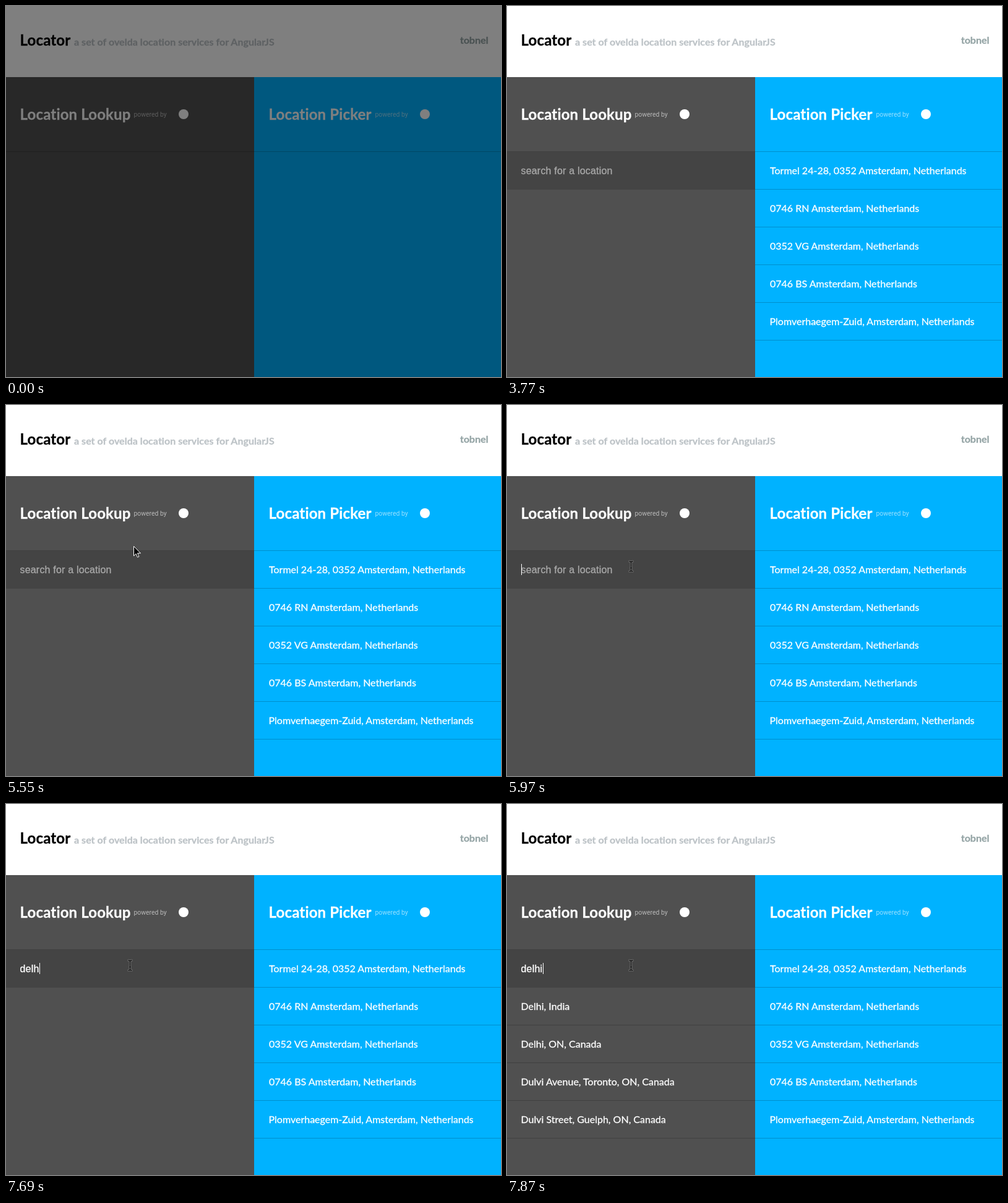
Recreate the animation shown at these times as an HTML page. Size 800x600 px, loop 8000 ms.

```html
<!DOCTYPE html>
<html lang="en">
<head>
<meta charset="utf-8">
<title>Locator</title>
<style>
  html, body { margin: 0; width: 100%; height: 100%; overflow: hidden; background: #fff; }
  svg { display: block; width: 800px; height: 600px; }
  text {
    --ink: #fff;
    font: 16px Lato, sans-serif;
    font-variant-ligatures: none;
    fill: var(--ink);
    stroke: var(--ink);
    stroke-width: .3px;
  }
  .title { font-size: 24px; font-weight: 700; letter-spacing: .15px; }
  .name { --ink: #000; }
  .note { --ink: #bdc3c7; font-weight: 700; letter-spacing: .03px; }
  .link { --ink: #95a5a6; font-weight: 700; text-anchor: end; }
  .by { font: 10.4px Roboto, sans-serif; fill-opacity: .6; stroke: none; }
  .input { font-family: "Liberation Sans", Arial, sans-serif; letter-spacing: .19px; }
  .hint { --ink: #a9a9a9; }
  .line { fill: #000; fill-opacity: .2; }
  .key { fill: #000; stroke: #fff; stroke-linejoin: round; }

  /* every step holds until the next one */
  .dim, .ready, .loading, .picks, .hint, .finds, .caret, .arrow, .beam, .typed tspan {
    animation: 8s step-end infinite;
  }
  .dim { animation-name: dim; }
  .ready { animation-name: ready; }
  .loading { animation-name: loading; }
  .picks { animation-name: picks; }
  .hint { animation-name: hint; }
  .finds { animation-name: finds; }
  .caret { animation-name: caret; }
  .arrow { animation-name: arrow; }
  .beam { animation-name: beam; }
  .typed .k1 { animation-name: k1; }
  .typed .k2 { animation-name: k2; }
  .typed .k3 { animation-name: k3; }
  .typed .k4 { animation-name: k4; }
  .typed .k5 { animation-name: k5; }

  @keyframes dim { 0% { visibility: visible } 1.5%, 100% { visibility: hidden } }
  @keyframes ready { 0% { visibility: hidden } 1.5%, 100% { visibility: visible } }
  @keyframes loading {
    0% { visibility: hidden } 1.5% { visibility: visible } 47.125%, 100% { visibility: hidden }
  }
  @keyframes picks { 0% { visibility: hidden } 47.125%, 100% { visibility: visible } }
  @keyframes hint {
    0% { visibility: hidden } 1.5% { visibility: visible } 88.75%, 100% { visibility: hidden }
  }
  @keyframes finds { 0% { visibility: hidden } 98.375%, 100% { visibility: visible } }

  @keyframes k1 { 0% { visibility: hidden } 88.75%, 100% { visibility: visible } }
  @keyframes k2 { 0% { visibility: hidden } 92.5%, 100% { visibility: visible } }
  @keyframes k3 { 0% { visibility: hidden } 93.25%, 100% { visibility: visible } }
  @keyframes k4 { 0% { visibility: hidden } 96.125%, 100% { visibility: visible } }
  @keyframes k5 { 0% { visibility: hidden } 97.625%, 100% { visibility: visible } }

  @keyframes caret {
    0% { opacity: 0; transform: translate(23px, 257px) }
    74.625% { opacity: 1; transform: translate(23px, 257px) }
    80.875% { opacity: 0; transform: translate(23px, 257px) }
    87.25% { opacity: 1; transform: translate(23px, 257px) }
    88.75% { opacity: 1; transform: translate(32px, 257px) }
    92.5% { opacity: 1; transform: translate(41px, 257px) }
    93.25% { opacity: 1; transform: translate(45px, 257px) }
    96.125% { opacity: 1; transform: translate(54px, 257px) }
    97.625%, 100% { opacity: 1; transform: translate(58px, 257px) }
  }
  @keyframes arrow {
    0% { opacity: 0; transform: translate(377px, 591px) }
    64.375% { opacity: 1; transform: translate(377px, 591px) }
    65.125% { opacity: 1; transform: translate(265px, 467px) }
    65.875% { opacity: 1; transform: translate(212px, 306px) }
    66.5% { opacity: 1; transform: translate(209px, 232px) }
    67.25% { opacity: 1; transform: translate(208px, 221px) }
    69.375% { opacity: 1; transform: translate(206px, 228px) }
    70.125%, 100% { opacity: 0; transform: translate(206px, 228px) }
  }
  @keyframes beam {
    0% { opacity: 0; transform: translate(203px, 249px) }
    70.125% { opacity: 1; transform: translate(203px, 249px) }
    70.875%, 100% { opacity: 1; transform: translate(200.5px, 261px) }
  }
</style>
</head>
<body>
<svg viewBox="0 0 800 600">
  <rect width="800" height="600" fill="#fff"/>
  <rect y="115" width="401" height="485" fill="#505050"/>
  <rect x="401" y="115" width="399" height="485" fill="#00b2ff"/>

  <text class="title name" x="22.5" y="64">Locator</text>
  <text class="note" x="110" y="64">a set of ovelda location services for AngularJS</text>
  <text class="link" x="779.5" y="61">tobnel</text>

  <text class="title" x="22.5" y="184">Location Lookup</text>
  <text class="by" x="206.5" y="179">powered by</text>
  <circle cx="287" cy="175" r="8" fill="#fff"/>
  <text class="title" x="424.5" y="184">Location Picker</text>
  <text class="by" x="596.5" y="179">powered by</text>
  <circle cx="677" cy="175" r="8" fill="#fff"/>
  <rect class="line" y="235" width="800" height="1"/>

  <g class="ready">
    <rect y="236" width="401" height="61" fill="#444"/>
    <rect class="line" x="401" y="296" width="399" height="1"/>
  </g>

  <g class="loading"><text x="424.5" y="272">Loading ...</text></g>

  <g class="picks">
    <text x="425" y="272">Tormel 24-28, 0352 Amsterdam, Netherlands</text>
    <text x="425" y="333">0746 RN Amsterdam, Netherlands</text>
    <text x="425" y="394">0352 VG Amsterdam, Netherlands</text>
    <text x="425" y="455">0746 BS Amsterdam, Netherlands</text>
    <text x="424.5" y="516">Plomverhaegem-Zuid, Amsterdam, Netherlands</text>
    <path class="line" d="M401 357h399v1h-399zM401 418h399v1h-399zM401 479h399v1h-399zM401 540h399v1h-399z"/>
  </g>

  <g class="finds">
    <text x="22.5" y="333">Delhi, India</text>
    <text x="22.5" y="394">Delhi, ON, Canada</text>
    <text x="22.5" y="455">Dulvi Avenue, Toronto, ON, Canada</text>
    <text x="22.5" y="516">Dulvi Street, Guelph, ON, Canada</text>
    <path class="line" d="M0 357h401v1h-401zM0 418h401v1h-401zM0 479h401v1h-401zM0 540h401v1h-401z"/>
  </g>

  <text class="input hint" x="22.5" y="272">search for a location</text>
  <text class="input typed" x="22.5" y="272"><tspan class="k1">d</tspan><tspan class="k2">e</tspan><tspan class="k3">l</tspan><tspan class="k4">h</tspan><tspan class="k5">i</tspan></text>
  <rect class="caret" width="1" height="18" fill="#fff"/>

  <path class="arrow key" d="M.5 .5v15.5l3.6-3.4 2.4 5.6 2.4-1-2.4-5.5h5z"/>
  <g class="beam" fill="none">
    <path d="M-4-8h2.8l1.2 1 1.2-1h2.8M-4 8h2.8l1.2-1 1.2 1h2.8M0-7V7M-2 2.5h4" stroke="#aaa" stroke-width="2.6"/>
    <path d="M-3.5-8h2.3l1.2 1 1.2-1h2.3M-3.5 8h2.3l1.2-1 1.2 1h2.3M0-7V7M-1.5 2.5h3" stroke="#000" stroke-width="1.4"/>
  </g>

  <rect class="dim" width="800" height="600" fill="#000" fill-opacity=".5"/>
</svg>
</body>
</html>
```
